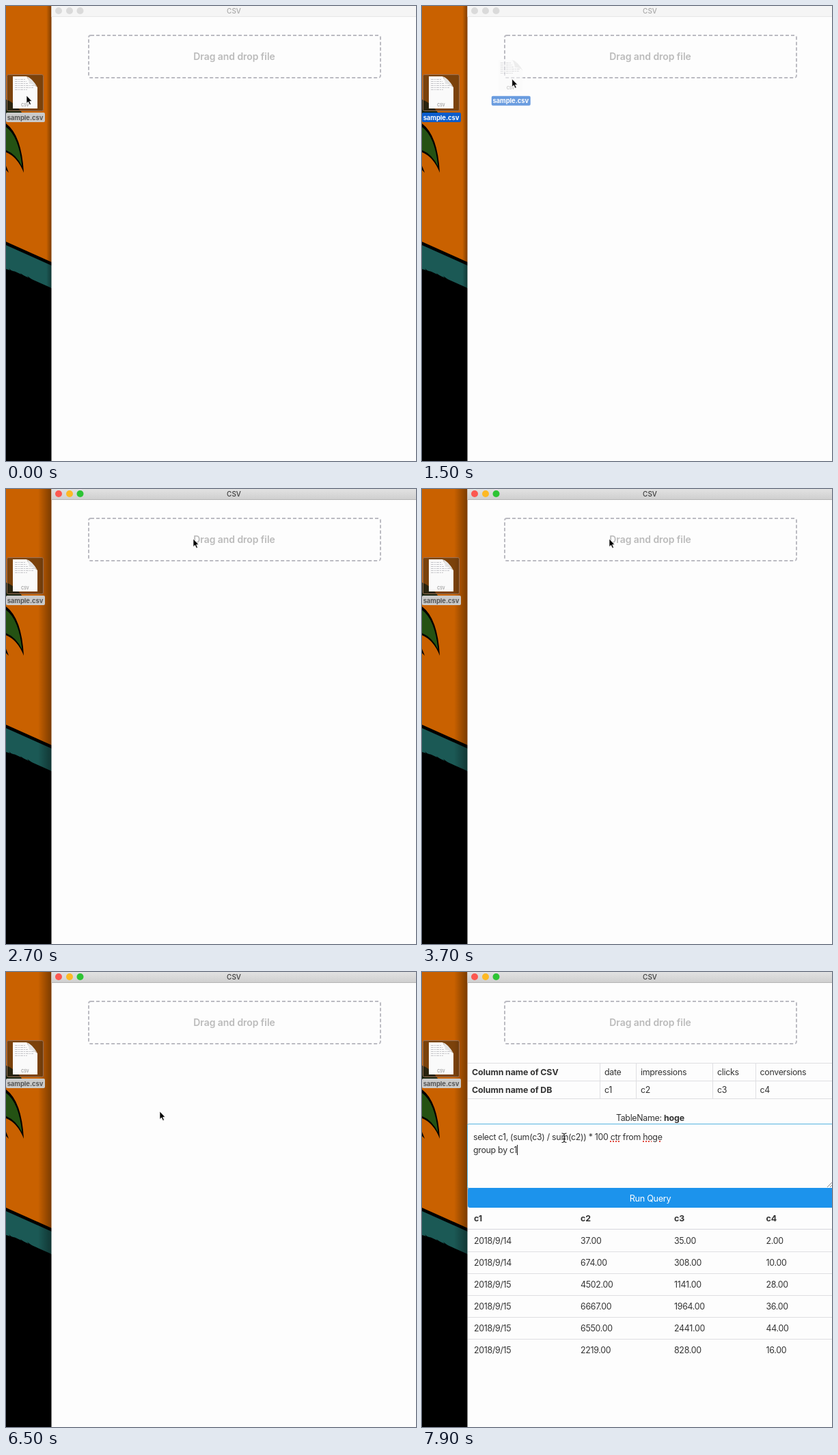
Recreate the animation shown at these times as an HTML page. Size 600 by 666 pixels, loop 8 s.

```html
<!DOCTYPE html>
<html lang="en">
<head>
<meta charset="utf-8">
<title>CSV</title>
<style>
  html, body { margin: 0; width: 100%; height: 100%; overflow: hidden; background: #fdfdfd; }
  svg { display: block; width: 600px; height: 666px; }
  text, #query { font: 12.4px Inter, "Open Sans", sans-serif; letter-spacing: -.024em; fill: #333; color: #333; }
  .b { font-weight: 700; letter-spacing: -.008em; }
  .mid { text-anchor: middle; }
  .rule { stroke: #dfdfe2; fill: none; }
  #query { line-height: 19px; white-space: pre; }
  #query u { text-decoration: underline dotted #e0483c 1.5px; text-underline-offset: 2px; }
  #query i { display: inline-block; width: 1px; height: 15px; margin-right: -1px; background: #222; vertical-align: -3px; }
</style>
</head>
<body>
<svg viewBox="0 0 600 666">
  <defs>
    <linearGradient id="bar" x2="0" y2="1">
      <stop stop-color="#e2e2e2"/><stop offset="1" stop-color="#cecece"/>
    </linearGradient>
    <linearGradient id="shade">
      <stop stop-opacity="0"/><stop offset="1" stop-opacity=".4"/>
    </linearGradient>
    <g id="paper">
      <path d="M10 103H30Q34 111 46 119V150H10Z" fill="#fafafa"/>
      <path d="M30 103Q38 105 46 119Q41 114 34 114Q34 108 30 103Z" fill="#e4e4e4"/>
      <path d="M13 107.5H28M13 110.5H30M13 113.5H32M13 116.5H41M13 119.5H40M13 122.5H31"
            stroke="#c4c4c8" stroke-dasharray="4 1 2 1"/>
      <text x="28" y="146.500" class="mid" style="font-size:5.5px;letter-spacing:0;fill:#777">CSV</text>
    </g>
  </defs>

  <!-- desktop -->
  <rect width="67" height="666" fill="#c96100"/>
  <path d="M0 137Q12 140 24 157H0Z" fill="#14200a"/>
  <path d="M0 172Q23 189 26 244Q17 221 0 214Z" fill="#000"/>
  <path d="M0 177Q19 191 23.500 235Q15 217 0 211Z" fill="#245213"/>
  <path d="M0 234L4 244L0 240Z"/>
  <path d="M0 345L67 375V666H0Z"/>
  <path d="M0 350L67 380V413L40 401L14 389L0 385Z" fill="#1b5955"/>
  <path d="M0 386L9 391L4 384L17 395L12 388L26 398L21 391L36 402L31 395L44 405V412H0Z"/>
  <rect id="shadow" height="412" fill="url(#shade)"/>

  <!-- file -->
  <rect x="1.500" y="100.500" width="53" height="53" rx="2" fill="#3c2814" fill-opacity=".55" stroke="#967058"/>
  <use href="#paper"/>
  <rect id="tag" y="156" width="57" height="14" rx="2"/>
  <text id="name" x="28" y="166.500" class="b mid" style="font-size:9.5px">sample.csv</text>

  <!-- window -->
  <rect x="66.500" width="534" height="666" fill="#fdfdfd"/>
  <rect id="title" x="66.500" width="534" height="16"/>
  <path id="edge" d="M67 15.500H600"/>
  <g id="lights"><circle cx="77" cy="7" r="5"/><circle cx="93" cy="7" r="5"/><circle cx="108.500" cy="7" r="5"/></g>
  <text id="caption" x="333.500" y="11" class="mid" style="font-size:10px;letter-spacing:0;font-weight:500">CSV</text>
  <rect x="121" y="43" width="427" height="62" rx="3" fill="none" stroke="#bbbbc2" stroke-width="2" stroke-dasharray="5 3"/>
  <text x="334" y="79" class="mid" style="font-size:14px;font-weight:600;letter-spacing:-.005em;fill:#bbb">Drag and drop file</text>

  <!-- loaded data -->
  <g id="data">
    <path class="rule" d="M67 133.500H600M67 159.500H600M67 185.500H600M260.500 133V185M313.500 133V185M425.500 133V185M488.500 133V185"/>
    <text x="334" y="218" class="mid">TableName: <tspan class="b">hoge</tspan></text>
    <rect id="area" x="66.500" y="222.500" width="540" height="94" rx="2" fill="#fdfdfd"/>
    <path d="M593 315L600 308M597 315L600 312" stroke="#888"/>
    <foreignObject x="75" y="231.500" width="500" height="60"><div id="query"></div></foreignObject>
    <rect x="67" y="316" width="540" height="29" rx="3" fill="#1c93ec"/>
    <text x="334" y="335.500" class="mid" style="fill:#fff;font-size:12.7px">Run Query</text>
    <path d="M67 376.500H600" stroke="#d6d6dc"/>
  </g>

  <g id="ghost" opacity=".6">
    <use href="#paper"/>
    <rect y="156" width="57" height="14" rx="2" fill="#0a5ccc"/>
    <text x="28" y="166.500" class="b mid" style="font-size:9.5px;fill:#fff">sample.csv</text>
  </g>
  <g id="cursor">
    <path id="arrow" d="M0 0V11.500L2.600 9.200L4.600 13.500L6.500 12.700L4.600 8.500H8Z" stroke="#fff" stroke-width=".7"/>
    <path id="beam" d="M-3.500 -6.500Q0 -6.500 0 -4Q0 -6.500 3.500 -6.500M0 -5V6M-3.500 7Q0 7 0 4.500Q0 7 3.500 7M-2 2H2" fill="none" stroke="#222" stroke-width="1.200"/>
  </g>
</svg>
<script>
const $ = id => document.getElementById(id);
const LOOP = 8000, STEP = 100;
const SELECT = 400, DROP = 2100, ACTIVATE = 2400, LOAD = 6800, TYPE = 7400, TYPED = 7900;
const FIRST = 'select * from hoge';
const QUERY = 'select c1, (sum(c3) / sum(c2)) * 100 ctr from hoge\ngroup by c1';

// cursor path: time, x, y
const PATH = [
  [0, 30, 131], [1100, 30, 131], [2000, 274, 73], [3800, 274, 73],
  [4600, 225, 204], [6500, 225, 204], [7300, 208, 242.5], [LOOP, 208, 242.5]
];

function label(str, x, y, bold) {
  const el = document.createElementNS('http://www.w3.org/2000/svg', 'text');
  el.setAttribute('x', x);
  el.setAttribute('y', y);
  if (bold) el.setAttribute('class', 'b');
  el.textContent = str;
  $('data').append(el);
}

function rule(y) {
  $('data').insertAdjacentHTML('beforeend', `<path class="rule" d="M67 ${y}H600"/>`);
}

function buildTables() {
  const names = [
    ['Column name of CSV', 'date', 'impressions', 'clicks', 'conversions'],
    ['Column name of DB', 'c1', 'c2', 'c3', 'c4']
  ];
  names.forEach((row, r) => row.forEach((s, c) =>
    label(s, [73, 267, 320, 432, 494.5][c], 151 + 26 * r, c === 0)));

  const cols = [76, 232, 369, 503.5];
  ['c1', 'c2', 'c3', 'c4'].forEach((s, c) => label(s, cols[c], 365, true));
  const rows = [[14, 37, 35, 2], [14, 674, 308, 10], [15, 4502, 1141, 28],
    [15, 6667, 1964, 36], [15, 6550, 2441, 44], [15, 2219, 828, 16]];
  rows.forEach(([day, ...nums], r) => {
    label('2018/9/' + day, cols[0], 398 + 32 * r);
    nums.forEach((n, c) => label(n.toFixed(2), cols[c + 1], 398 + 32 * r));
    if (r) rule(377.5 + 32 * r);
  });
}

function cursorAt(t) {
  const i = PATH.findIndex(p => p[0] > t);
  const [t0, x0, y0] = PATH[i - 1], [t1, x1, y1] = PATH[i];
  const u = (t - t0) / (t1 - t0), k = u * u * (3 - 2 * u);
  return [x0 + (x1 - x0) * k, y0 + (y1 - y0) * k];
}

const show = (id, on) => { $(id).style.display = on ? '' : 'none'; };
const set = (id, name, value) => $(id).setAttribute(name, value);

function drawWindow(active) {
  set('title', 'fill', active ? 'url(#bar)' : '#f5f5f5');
  set('edge', 'stroke', active ? '#b4b4b4' : '#e6e6e6');
  $('caption').style.fill = active ? '#3c3c3c' : '#a8a8a8';
  const colors = active ? ['#fc5850', '#fdb924', '#2dc434'] : Array(3).fill('#dadada');
  [...$('lights').children].forEach((dot, i) => dot.setAttribute('fill', colors[i]));
  set('shadow', 'x', active ? 47 : 59);
  set('shadow', 'width', active ? 20 : 8);
}

function drawQuery(t) {
  const typing = t >= TYPE;
  const k = Math.min(1, (t - TYPE) / (TYPED - TYPE));
  const str = typing ? QUERY.slice(0, Math.round(7 + (QUERY.length - 7) * k)) : FIRST;
  $('query').innerHTML = typing ? str.replace(/\b(ctr|hoge)\b/g, '<u>$1</u>') + '<i></i>' : str;
  set('area', 'stroke', typing ? '#55b4e0' : '#d6d6dc');
}

function draw(time) {
  const t = Math.floor(time / STEP) * STEP;
  const [x, y] = cursorAt(t);
  const selected = t >= SELECT && t < ACTIVATE, loaded = t >= LOAD;
  const overText = loaded && y > 222;

  drawWindow(t >= ACTIVATE);
  set('tag', 'fill', selected ? '#0a5ccc' : '#cacaca');
  $('name').style.fill = selected ? '#fff' : '#555';

  show('ghost', t > 1100 && t < DROP);
  set('ghost', 'transform', `translate(${x - 30} ${y - 131})`);
  show('data', loaded);
  if (loaded) drawQuery(t);

  set('cursor', 'transform', `translate(${x} ${y})`);
  show('arrow', !overText);
  show('beam', overText);
}

buildTables();
const start = performance.now();
function tick() {
  draw((performance.now() - start) % LOOP);
  requestAnimationFrame(tick);
}
tick();
</script>
</body>
</html>
```
